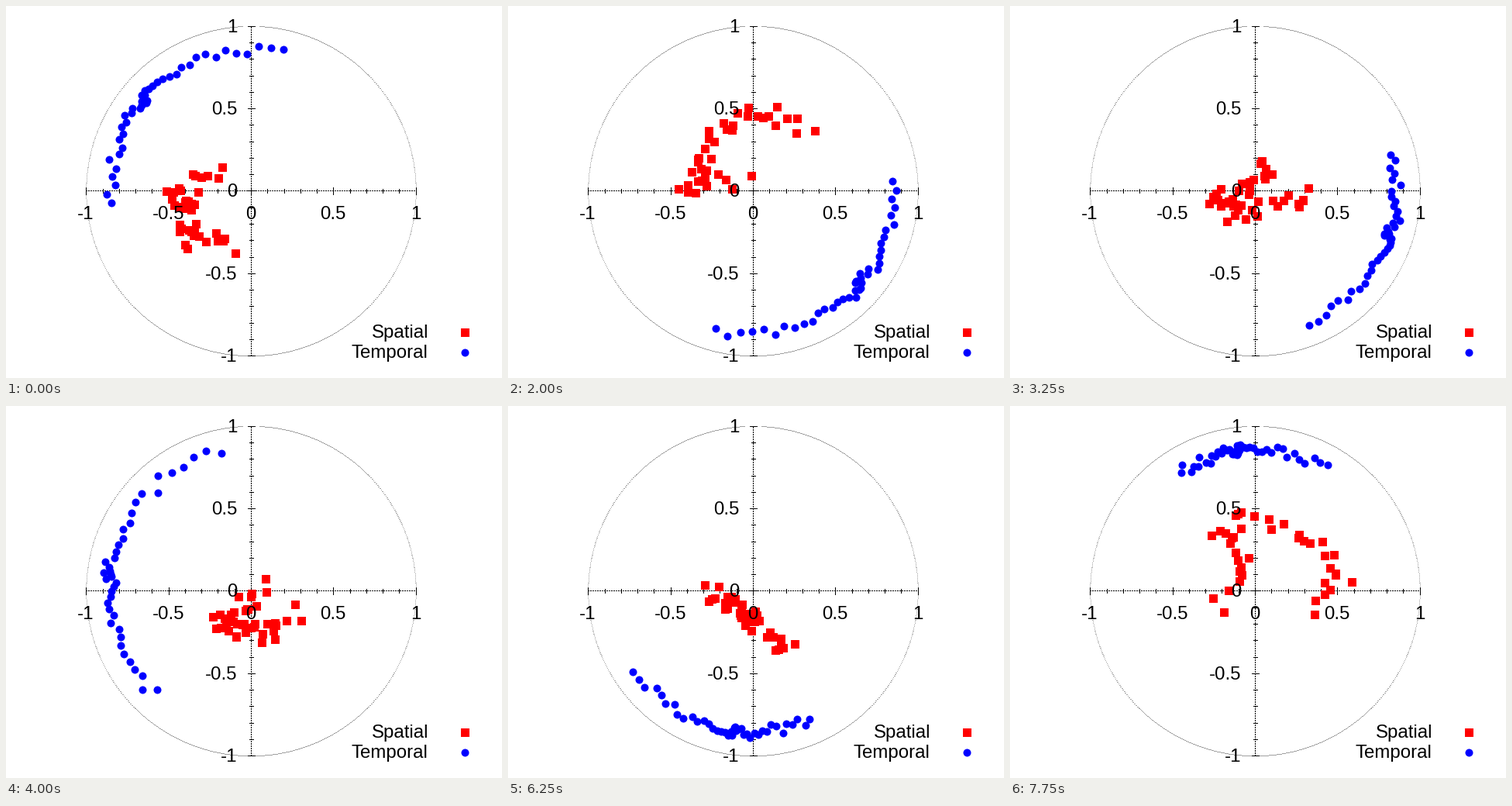
These frames come from a looping animation (640 by 480 pixels, 8 s). A matplotlib script:

```python
import numpy as np
import matplotlib.pyplot as plt
from matplotlib.animation import FuncAnimation

W, H, DPI = 640, 480, 100
FRAMES, INTERVAL = 32, 250
CX, CY, R = 316, 238.5, 212.75
AXIS_Y = 238
DOTS = 40
PX = 72 / DPI  # one pixel in points

plt.rcParams["font.family"] = "Liberation Sans"
rng = np.random.default_rng(7)

# Swarm on the rim: frame, first, middle and last angle in degrees.
RING = np.array([
    (0, 77, 139, 185), (3, 113, 144, 256), (5, 182, 238, 357),
    (8, 255, 318, 364), (10, 270, 352, 413), (13, 292, 341, 375),
    (15, 425, 490, 545), (20, 610, 706, 753), (22, 650, 720, 790),
    (25, 574, 622, 654), (30, 426, 455, 484), (31, 420, 457, 482),
])

# Swarm in the middle: a bent path for each key frame, in pixels.
CLOUD = {
    0: [(275, 215), (215, 246), (245, 258), (228, 298), (288, 308)],
    3: [(325, 240), (285, 222), (280, 268), (255, 305), (308, 345), (362, 300)],
    8: [(390, 160), (325, 132), (262, 160), (252, 205), (228, 236), (303, 226)],
    13: [(330, 203), (310, 236), (264, 248), (290, 272), (335, 255), (388, 242)],
    20: [(338, 265), (287, 295), (280, 335), (312, 310), (325, 345), (368, 302)],
    25: [(258, 236), (285, 255), (305, 270), (322, 285), (365, 312)],
    31: [(392, 262), (433, 220), (385, 165), (315, 142), (268, 158), (308, 205),
         (265, 258)],
}

rank = np.linspace(-1, 1, DOTS)
radius = R * rng.uniform(0.83, 0.89, DOTS)
sway = rng.uniform(0, 2 * np.pi, DOTS)
reach = 15 * np.sqrt(rng.uniform(0, 1, DOTS))


def along(path):
    """Spread the dots evenly along a path."""
    step = np.linspace(0, len(path) - 1, DOTS)
    return np.array([np.interp(step, range(len(path)), c) for c in zip(*path)])


def temporal_dots(frame):
    first, mid, last = (np.interp(frame, RING[:, 0], c) for c in RING.T[1:])
    side = np.where(rank < 0, mid - first, last - mid)
    # The power crowds the dots around the middle angle.
    angle = np.radians(mid + side * np.sign(rank) * abs(rank) ** 1.6)
    r = radius + 3 * np.sin(sway + frame)
    return CX + r * np.cos(angle), CY - r * np.sin(angle)


def spatial_dots(frame):
    a = max(k for k in CLOUD if k <= frame)
    b = min(k for k in CLOUD if k >= frame)
    t = (frame - a) / max(b - a, 1)
    x, y = along(CLOUD[a]) * (1 - t) + along(CLOUD[b]) * t
    turn = sway + 0.6 * frame
    return x + reach * np.cos(turn), y + reach * np.sin(turn)


fig = plt.figure(figsize=(W / DPI, H / DPI), dpi=DPI, facecolor="white")
ax = fig.add_axes([0, 0, 1, 1])
ax.set_xlim(0, W)
ax.set_ylim(H, 0)
ax.axis("off")


def line(xs, ys, **style):
    ax.plot(xs, ys, color="black", lw=PX, antialiased=False,
            solid_capstyle="butt", **style)


def label(x, y, text, ha):
    ax.text(x, y, text, fontsize=24 * PX, ha=ha, va="baseline", color="black")


def markers(shape, color, size, x=(), y=()):
    return ax.plot(np.round(x), np.round(y), shape, color=color, ms=size * PX,
                   mew=0, antialiased=False)[0]


# One-pixel rim, drawn as four quarter arcs; the top one has a small gap.
t = np.arange(-151, 152)
s = np.sqrt(R ** 2 - t ** 2)
top = abs(t) > 10
markers("s", "#a0a0a0", 1, CX + t[top], CY - s[top])
markers("s", "#a0a0a0", 1, CX + t, CY + s)
for side in (-s, s):
    markers("s", "#a0a0a0", 1, CX + side, CY + t)

dotted = dict(linestyle=(0, (2, 2)), dash_capstyle="butt")
line([CX - R, CX + R], [AXIS_Y, AXIS_Y], **dotted)
line([CX, CX], [CY + R, CY - R], **dotted)
for i in range(-10, 11):
    half = 4.5 if i % 5 == 0 else 2.5
    x, y = round(CX + R * i / 10), round(CY - R * i / 10)
    line([x, x], [AXIS_Y - half, AXIS_Y + half])
    line([CX - half, CX + half], [y, y])
    if i % 5 == 0:
        text = f"{i / 10:g}"
        label(x, 275, text, "center")
        label(298.5, y + 8, text, "right")

label(545.5, 428, "Spatial", "right")
label(544.5, 454, "Temporal", "right")
markers("s", "red", 11, [592], [421])
markers("o", "blue", 10, [592], [447])

spatial = markers("s", "red", 11)
temporal = markers("o", "blue", 10)


def draw(frame):
    spatial.set_data(*np.round(spatial_dots(frame)))
    temporal.set_data(*np.round(temporal_dots(frame)))
    return spatial, temporal


anim = FuncAnimation(fig, draw, frames=FRAMES, interval=INTERVAL,
                     repeat=True, repeat_delay=0)
plt.show()
```
